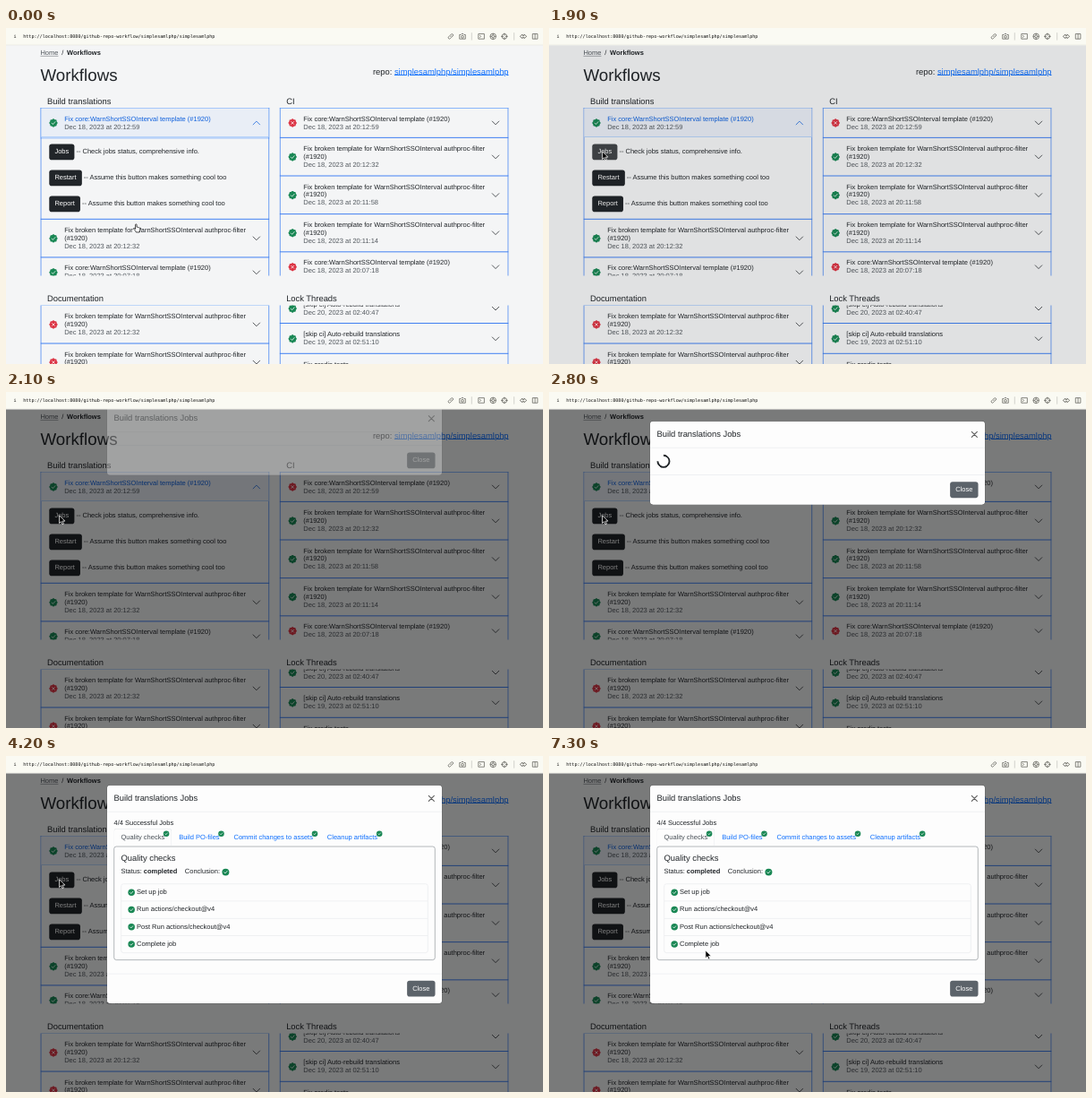
An HTML page that plays this animation: 600x375 px, repeating every 7.4 s.

```html
<!DOCTYPE html>
<html lang="en">
<head>
<meta charset="utf-8">
<title>Workflows</title>
<style>
* { box-sizing: border-box; }
html, body { margin: 0; width: 100%; height: 100%; overflow: hidden; background: #f4f5f6; }
#stage { position: absolute; left: 0; top: 0; width: 1280px; height: 800px; overflow: hidden;
  transform: scale(.46875); transform-origin: 0 0; background: #f4f5f6; color: #212529;
  font: 16px/24px "Liberation Sans", Arial, sans-serif; text-rendering: geometricPrecision; }
svg { display: block; flex: none; overflow: visible; }
.at { position: absolute; white-space: nowrap; transform: translateY(-50%); }
.h5 { font-size: 20px; line-height: 24px; }
u { color: #0d6efd; }
.bar { position: absolute; left: 0; top: 0; width: 1280px; height: 41px; background: #fafaf3; border-bottom: 1px solid #d9d9d4; }
.bar .at { top: 20px; color: #111; font: 10.85px/16px "DejaVu Sans Mono", monospace; }
.bar svg { position: absolute; top: 12px; }
#sections { position: absolute; inset: 0; isolation: isolate; }
.list { position: absolute; width: 546px; height: 400px; overflow: hidden; }
.item { border: 2px solid #3579f2; border-top: 0; }
.item:first-child { border-top: 1px solid #0d6efd; }
.head { position: relative; display: flex; align-items: center; padding: 16px 19px 15px; line-height: 19.2px; }
.head div { flex: 1; margin-left: 16px; white-space: nowrap; }
.head small { display: block; font-size: 16px; color: #52585e; }
.open .head { color: #0d5fdc; background: #e9eef6; box-shadow: inset 0 -1px #86b7fe; z-index: 1; }
.open .head.focus { box-shadow: 0 0 0 4px rgba(13,110,253,.25), inset 0 -1px #86b7fe; }
.panel { padding: 16px 19px; height: 194px; }
.panel p { margin: 0 0 24px; height: 38px; white-space: nowrap; }
.btn { display: inline-block; padding: 7px 13px; border-radius: 6px; color: #fff; background: #212529; }
#backdrop { position: absolute; inset: 41px 0 0; background: #000; }
#view { position: absolute; inset: 41px 0 0; overflow: hidden; }
#modal { position: absolute; left: 240px; top: 28px; width: 800px; background: #fdfdfd padding-box; border: 1px solid rgba(0,0,0,.175); border-radius: 8px; }
.mhead { display: flex; justify-content: space-between; align-items: center; height: 63px; padding: 0 16px; border-bottom: 1px solid #dee2e6; font-size: 20px; }
.mhead svg { margin-right: 1px; opacity: .65; }
.mbody { padding: 16px; }
.mfoot { height: 71px; padding: 16px; border-top: 1px solid #dee2e6; text-align: right; }
.mfoot .btn { background: #5c636a; }
#spinner { width: 32px; height: 32px; border: 4px solid #212529; border-right-color: transparent; border-radius: 50%; }
.tabs { display: flex; height: 42px; }
.tabs span { position: relative; padding: 8px 16px; border: 1px solid transparent; color: #0d6efd; white-space: nowrap; }
.tabs span:first-child { color: #495057; border-color: #dee2e6 #dee2e6 transparent; border-radius: 6px 6px 0 0; }
.tabs svg { position: absolute; right: 5px; top: 4px; }
.card { height: 271px; margin-bottom: 16px; padding: 16px; border: 1px solid #5f676e; border-radius: 6px; }
.status { display: flex; align-items: center; margin: 8px 0 16px; height: 24px; white-space: pre; }
.steps { border: 1px solid #dee2e6; border-radius: 6px; }
.steps div { display: flex; align-items: center; gap: 4.4px; height: 41px; padding: 0 16px; border-top: 1px solid #dee2e6; }
.steps div:first-child { height: 40px; border-top: 0; }
#cursor { position: absolute; left: 0; top: 0; }
</style>
</head>
<body>
<div id="stage">
  <div class="at" style="left:82px;top:61px"><u style="color:#52585e">Home</u><span style="margin:0 8px">/</span><b>Workflows</b></div>
  <div class="at" style="left:82px;top:113px;font-size:40px;line-height:48px">Workflows</div>
  <div class="at h5" style="right:82px;top:104px">repo: <u>simplesamlphp/simplesamlphp</u></div>
  <div id="sections"></div>
  <div id="backdrop"></div>
  <div id="view">
    <div id="modal">
      <div class="mhead">Build translations Jobs
        <svg width="16" height="16" stroke="#000" stroke-width="2.2" stroke-linecap="round"><path d="M1.5 1.5 14.5 14.5M14.5 1.5 1.5 14.5"/></svg>
      </div>
      <div class="mbody"><div id="spinner"></div><div id="jobs"></div></div>
      <div class="mfoot"><span class="btn">Close</span></div>
    </div>
  </div>
  <div class="bar" id="bar">
    <b class="at" style="left:18px">i</b>
    <span class="at" style="left:41px">http://localhost:8080/github-repo-workflow/simplesamlphp/simplesamlphp</span>
  </div>
  <svg id="cursor" width="24" height="24">
    <path id="arrow" d="M0 0V18.5l4.4-4 2.9 6.7 3.2-1.4-2.9-6.5h6z" fill="#000" stroke="#fff" stroke-width="1.6"/>
    <path id="hand" transform="translate(-7.6 -1.2)" d="M6 2.8a1.6 1.6 0 0 1 3.2 0V8.3c.6-.7 2.4-.6 2.8.5.8-.6 2.4-.3 2.7.9.9-.5 2.4 0 2.4 1.5V15c0 2-1.2 2.8-1.4 5.5H7.6C7.4 18 4.5 16 2 12.5.9 10.8 2.8 9.8 4.2 11.2L6 13z" fill="#fff" stroke="#000" stroke-width="1.5" stroke-linejoin="round"/>
  </svg>
</div>
<script>
const $ = id => document.getElementById(id);
const CORE = 'Fix core:WarnShortSSOInterval template (#1920)';
const BROKEN = 'Fix broken template for WarnShortSSOInterval authproc-filter<br>(#1920)';
const REBUILD = '[skip ci] Auto-rebuild translations';

// Eight-lobed status seal
const seal = 'M' + Array.from({ length: 64 }, (_, i) => {
  const a = i * Math.PI / 32, r = 9.3 + .7 * Math.cos(8 * a);
  return (10 + r * Math.cos(a)).toFixed(2) + ' ' + (10 + r * Math.sin(a)).toFixed(2);
}).join('L') + 'z';
const TICK = 'M6 10.4l2.9 2.9 5.3-6', CROSS = 'M7 7l6 6M13 7l-6 6';
const statusIcon = ok => `<svg width="20" height="20"><path d="${seal}" fill="${ok ? '#198754' : '#dc3545'}"/>
  <path d="${ok ? TICK : CROSS}" fill="none" stroke="#fff" stroke-width="1.6" stroke-linecap="round"/></svg>`;
const check = size => `<svg width="${size}" height="${size}" viewBox="0 0 20 20"><circle cx="10" cy="10" r="10" fill="#198754"/>
  <path d="${TICK}" fill="none" stroke="#fff" stroke-width="2" stroke-linecap="round"/></svg>`;
const chevron = up => `<svg width="20" height="20" fill="none" stroke="${up ? '#0d5fdc' : '#212529'}" stroke-width="1.6"
  stroke-linecap="round" stroke-linejoin="round"><path d="${up ? 'M2 14l8-8 8 8' : 'M2 6l8 8 8-8'}"/></svg>`;

const action = (name, text) => `<p><span class="btn" id="${name}">${name}</span> -- ${text}</p>`;
const panel = '<div class="panel">' + action('Jobs', 'Check jobs status, comprehensive info.')
  + action('Restart', 'Assume this button makes something cool too')
  + action('Report', 'Assume this button makes something cool too') + '</div>';
const item = ([ok, title, date, open]) => `<div class="item ${open ? 'open' : ''}"><div class="head">${statusIcon(ok)}
  <div>${title}<small>Dec ${date.replace(' ', ', 2023 at ')}</small></div>${chevron(open)}</div>${open ? panel : ''}</div>`;
const section = (name, x, y, items, scroll = 0) => `<div class="at h5" style="left:${x + 16}px;top:${y - 15}px">${name}</div>
  <div class="list" style="left:${x}px;top:${y}px"><div style="margin-top:${-scroll}px">${items.map(item).join('')}</div></div>`;

$('sections').innerHTML =
  section('Build translations', 82, 190, [
    [1, CORE, '18 20:12:59', 1], [1, BROKEN, '18 20:12:32'], [1, CORE, '18 20:07:18']]) +
  section('CI', 652, 190, [
    [0, CORE, '18 20:12:59'], [1, BROKEN, '18 20:12:32'], [1, BROKEN, '18 20:11:58'],
    [1, BROKEN, '18 20:11:14'], [0, CORE, '18 20:07:18']]) +
  section('Documentation', 82, 660, [[0, BROKEN, '18 20:12:32'], [0, BROKEN, '18 20:11:58']]) +
  section('Lock Threads', 652, 660, [
    [1, REBUILD, '20 02:40:47'], [1, REBUILD, '19 02:51:10'], [1, 'Fix predis tests', '18 20:12:32']], 28);

const tabs = ['Quality checks', 'Build PO-files', 'Commit changes to assets', 'Cleanup artifacts'];
const steps = ['Set up job', 'Run actions/checkout@v4', 'Post Run actions/checkout@v4', 'Complete job'];
$('jobs').innerHTML = `<div>4/4 Successful Jobs</div>
  <div class="tabs">${tabs.map(name => `<span>${name}${check(14)}</span>`).join('')}</div>
  <div class="card"><div class="h5">Quality checks</div>
  <div class="status">Status: <b>completed</b><span style="margin:0 5px 0 18px">Conclusion:</span>${check(17)}</div>
  <div class="steps">${steps.map(name => `<div>${check(16)}${name}</div>`).join('')}</div></div>`;

// Toolbar icons: centre x and outline in a 16px box
const DIVIDER = 'M8-1V17';
const tools = [
  [1060, 'M7 9l3-3M6 6L9 3a2.8 2.8 0 0 1 4 4l-3 3M10 10l-3 3a2.8 2.8 0 0 1-4-4l3-3'],
  [1088, 'M1 4h3l2-2h4l2 2h3v10H1zM5 9a3 3 0 1 0 6 0a3 3 0 1 0-6 0'],
  [1110, DIVIDER],
  [1133, 'M1 2h14v12H1zM4 5l3 3-3 3'],
  [1161, 'M1 8a7 7 0 1 0 14 0a7 7 0 1 0-14 0M5 8a3 3 0 1 0 6 0a3 3 0 1 0-6 0M8 1v4M8 11v4M1 8h4M11 8h4'],
  [1188, 'M2 8a6 6 0 1 0 12 0a6 6 0 1 0-12 0M8 0v6M8 10v6M0 8h6M10 8h6'],
  [1211, DIVIDER],
  [1233, 'M6 3L0 8l6 5V10h4v3l6-5-6-5v3H6z'],
  [1261, 'M2 2h12v12H2zM8 2v12']];
$('bar').insertAdjacentHTML('beforeend', tools.map(([x, d]) =>
  `<svg width="16" height="16" style="left:${x - 8}px" fill="none" stroke="${d === DIVIDER ? '#c4c4be' : '#55554f'}" stroke-width="1.5"><path d="${d}"/></svg>`).join(''));

const LOOP = 7400, TICK_MS = 100;
const CLICK = 1875, SHOW = 2055, WAIT = 2200, LOADED = 3500;
const path = [[0, 310, 467], [400, 310, 467], [1400, 127, 294], [4500, 127, 294],
  [5200, 307, 203], [5800, 307, 203], [6800, 373, 463], [LOOP, 373, 463]];
const handTimes = [[0, 500], [1200, 1900], [5000, 6000]];

const focusHead = document.querySelector('.open .head');
const clamp = v => Math.min(1, Math.max(0, v));
const within = (t, a, b) => t >= a && t < b;
const toggle = (el, on) => { el.style.display = on ? '' : 'none'; };

function cursorAt(t) {
  const i = path.findIndex(p => p[0] > t);
  const [t0, x0, y0] = path[i - 1], [t1, x1, y1] = path[i];
  const p = (t - t0) / (t1 - t0), e = p * p * (3 - 2 * p);
  return [x0 + (x1 - x0) * e, y0 + (y1 - y0) * e];
}

function render(t) {
  const slide = Math.pow(1 - clamp((t - SHOW) / 300), 1.7);
  $('backdrop').style.opacity = .5 * clamp((t - CLICK) / 150);
  $('modal').style.opacity = clamp((t - SHOW) / 150);
  $('modal').style.transform = `translateY(${-50 * slide}px)`;
  toggle($('spinner'), within(t, WAIT, LOADED));
  $('spinner').style.transform = `rotate(${225 + (t - 2800) * .48}deg)`;
  toggle($('jobs'), t >= LOADED);
  $('Jobs').style.background = within(t, 1200, 2000) ? '#424649' : '';
  focusHead.classList.toggle('focus', t < CLICK);

  const [x, y] = cursorAt(t);
  const hand = handTimes.some(([a, b]) => within(t, a, b));
  $('cursor').style.transform = `translate(${x}px,${y}px)`;
  toggle($('hand'), hand);
  toggle($('arrow'), !hand);
}

const start = performance.now();
function frame() {
  const t = (performance.now() - start) % LOOP;
  render(Math.floor(t / TICK_MS) * TICK_MS);
  requestAnimationFrame(frame);
}
frame();
</script>
</body>
</html>
```
